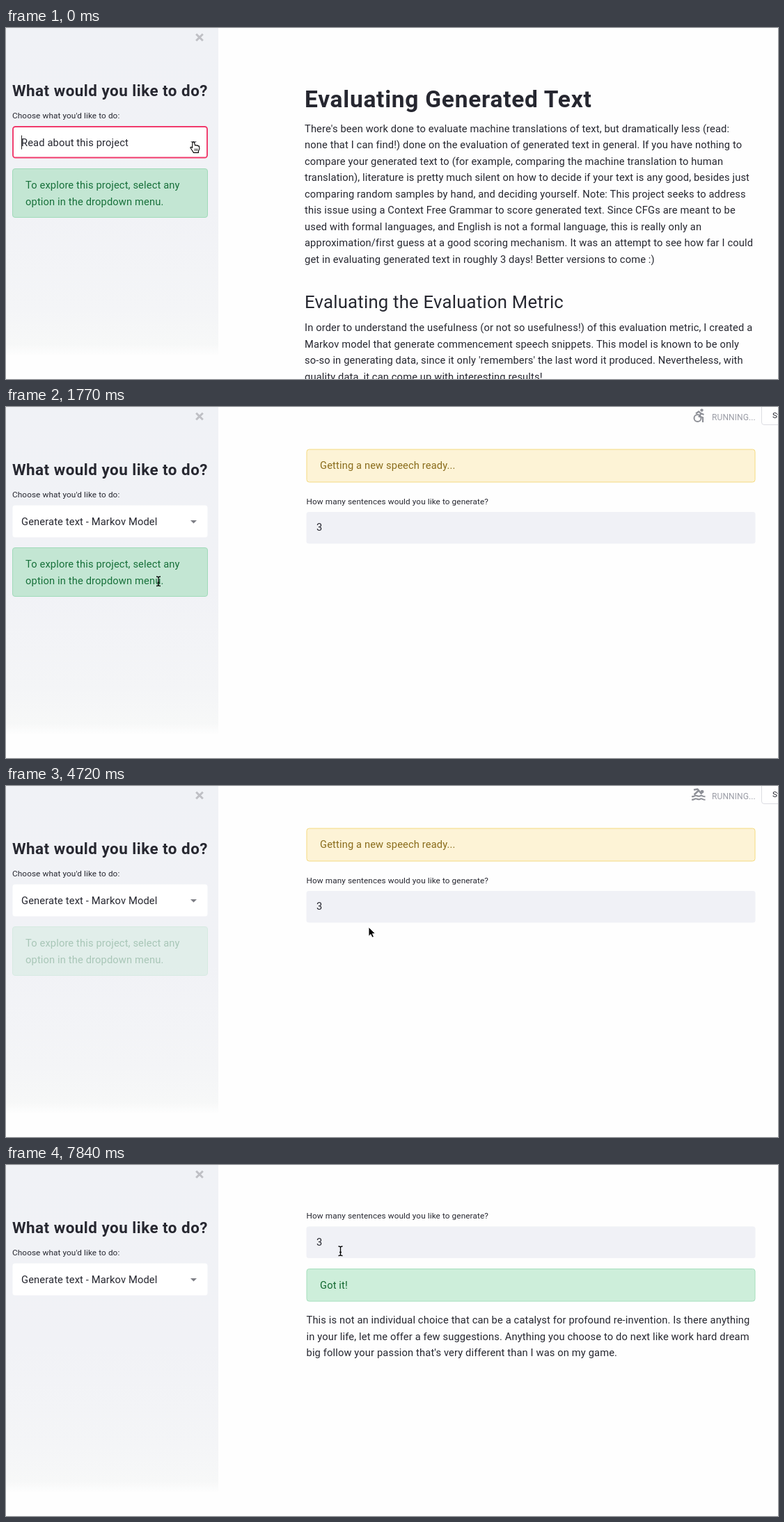
Recreate the animation shown at these times as an HTML page. Size 1109 by 505 pixels, loop 7990 ms.

```html
<!DOCTYPE html>
<html lang="en">
<head>
<meta charset="utf-8">
<title>Evaluating Generated Text</title>
<style>
  html, body { margin: 0; width: 100%; height: 100%; overflow: hidden; background: #fefefe; }
  svg { display: block; width: 1109px; height: 505px; }
  text { font-family: Roboto, "Open Sans", sans-serif; letter-spacing: .009em; white-space: pre; }
  text.bold { font-weight: 700; letter-spacing: .022em; }
</style>
</head>
<body>
<svg id="stage" viewBox="0 0 1109 505" xmlns="http://www.w3.org/2000/svg"></svg>
<script>
const LOOP = 7990, STEP = 148;
const INK = "#262730", GREY = "#808495";
const BODY = 14.7, SMALL = 11.75, LEAD = 23.55, ROW = 38.45;

const text = (x, y, str, size = BODY, fill = INK, cls = "") =>
  `<text x="${x}" y="${y}" font-size="${size}" fill="${fill}" class="${cls}">${str}</text>`;
const lines = (x, y, list, fill = INK) =>
  list.map((s, i) => text(x, y + i * LEAD, s, BODY, fill)).join("");
const rect = (x, y, w, h, fill, stroke = "none", sw = 1) =>
  `<rect x="${x}" y="${y}" width="${w}" height="${h}" rx="3.5" fill="${fill}" stroke="${stroke}" stroke-width="${sw}"/>`;
const group = (id, inner) => `<g id="${id}">${inner}</g>`;
const line = (d, w = 2.2) =>
  `<path d="${d}" fill="none" stroke="#8e9097" stroke-width="${w}" stroke-linejoin="round"/>`;
const dot = (x, y, r = 2.1) => `<circle cx="${x}" cy="${y}" r="${r}" fill="#8e9097"/>`;

const sidebar = `
  <rect width="305" height="472" fill="url(#side)"/>
  <path d="M273.2 8.7l9.6 9.6m0-9.6l-9.6 9.6" stroke="#bfc0c5" stroke-width="3"/>`
  + text(9, 98, "What would you like to do?", 22.4, INK, "bold")
  + text(9, 130, "Choose what you'd like to do:", SMALL);

const article =
  text(429, 113.5, "Evaluating Generated Text", 33.5, INK, "bold")
  + lines(429, 149.5, [
    "There's been work done to evaluate machine translations of text, but dramatically less (read:",
    "none that I can find!) done on the evaluation of generated text in general. If you have nothing to",
    "compare your generated text to (for example, comparing the machine translation to human",
    "translation), literature is pretty much silent on how to decide if your text is any good, besides just",
    "comparing random samples by hand, and deciding yourself. Note: This project seeks to address",
    "this issue using a Context Free Grammar to score generated text. Since CFGs are meant to be",
    "used with formal languages, and English is not a formal language, this is really only an",
    "approximation/first guess at a good scoring mechanism. It was an attempt to see how far I could",
    "get in evaluating generated text in roughly 3 days! Better versions to come :)"])
  + text(429, 402.5, "Evaluating the Evaluation Metric", 25.7)
  + lines(429, 436, [
    "In order to understand the usefulness (or not so usefulness!) of this evaluation metric, I created a",
    "Markov model that generate commencement speech snippets. This model is known to be only",
    "so-so in generating data, since it only 'remembers' the last word it produced. Nevertheless, with",
    "quality data, it can come up with interesting results!"]);

const question =
  text(431.5, 139.5, "How many sentences would you like to generate?", SMALL)
  + rect(431.5, 151, 645, 45.5, "#f0f1f6")
  + text(446, 178.3, "3");

const warning = rect(432, 61, 644, 47, "#fdf3d6", "#f4da80")
  + text(451, 89.3, "Getting a new speech ready...", BODY, "#8a6c1b");

const result = rect(432, 149.5, 644, 46.5, "#cdeeda", "#a6dfbd")
  + text(451, 177.5, "Got it!", BODY, "#12682f")
  + lines(431.5, 228, [
    "This is not an individual choice that can be a catalyst for profound re-invention. Is there anything",
    "in your life, let me offer a few suggestions. Anything you choose to do next like work hard dream",
    "big follow your passion that's very different than I was on my game."]);

const alertBox = rect(9.5, 202.5, 280, 70, "#c3e6d3", "#a0dab9")
  + lines(28, 231, ["To explore this project, select any", "option in the dropdown menu."], "#17703a");

const options = ["Read about this project", "Generate text - Markov Model", "Classify the type of speaker", "Evaluate text"];
const menu = `<rect x="8" y="195" width="281" height="168" rx="3.5" fill="#fff" filter="url(#shade)"/>`
  + options.map((s, i) => text(23, 225.7 + i * ROW, s, BODY, i ? GREY : INK, i ? "option" : "bold")).join("");

const icons = {
  run: `<path transform="translate(983 .8) scale(.93)" fill="#8e9097" d="M13.5 5.5c1.1 0 2-.9 2-2s-.9-2-2-2-2 .9-2 2 .9 2 2 2zm-3.6 13.9l1-4.4 2.1 2v6h2v-7.5l-2.1-2 .6-3c1.3 1.5 3.3 2.5 5.5 2.5v-2c-1.9 0-3.5-1-4.3-2.4l-1-1.6c-.4-.6-1-1-1.7-1-.3 0-.5.1-.8.1l-5.2 2.2v4.7h2v-3.4l1.8-.7-1.6 8.1-4.9-1-.4 2 7 1.4z"/>`,
  swim: dot(1000, 8.2, 2.4) + line("M988 5.5l5.5-1 6 7.2M995 6.5l-6.5 6", 2.4)
    + [15.3, 19.8].map(y => line(`M985 ${y}q2.5 0 4-1t4 0 4 0 3.5 0 4 1`, 2)).join(""),
  wheel: dot(999.5, 4.6, 2.2) + `<circle cx="993.5" cy="16" r="5" fill="none" stroke="#8e9097" stroke-width="2"/>`
    + line("M991 9.5l4.2-3 3.3 3.2-3 4 5.5 1.3v7M998 9l4.5 2"),
  climb: dot(997.5, 4, 2.2) + line("M995 8l-2.5 6.5 6 2.5-.5 6M994.5 8.5l-5 5M996 9l3 3.5 3-.5M992.5 14l-2.5 4.5-3 3.5", 2.4)
};
const cycle = ["swim", "wheel", "climb", "run", "wheel", "swim", "climb", "run"];

const status = Object.entries(icons).map(([id, art]) => group(id, art)).join("")
  + text(1014, 18.8, "RUNNING...", 12, "#9b9da6")
  + rect(1085.5, -8, 60, 33.5, "#fff", "#dcdde2")
  + text(1101, 16.3, "Stop", SMALL);

const pointers = {
  arrow: `<path d="M0 0V13.2L3 10.4 5 15 7.4 14 5.4 9.5H9.5Z" fill="#000" stroke="#fff" stroke-width=".9"/>`,
  beam: `<path d="M-3-6.5q3 0 3 1.5 0-1.5 3-1.5M0-5V5.5M-3 7q3 0 3-1.5 0 1.5 3 1.5M-1.5 2h3" fill="none" stroke="#000" stroke-width="1.3"/>`,
  hand: `<path d="M-2-6.5q1.5-1.4 2.5.2l1 4.3 1.5-.6 1 .8 1.4-.3.8 1 1.2 0 .5 4-1.5 3.5v2H-.5L-3 4.5-5.2 1q.8-1.6 2.7.3z" fill="#fff" stroke="#000" stroke-width="1.1" stroke-linejoin="round"/>
    <path d="M1.3 2.5v3.3M3.2 2.5v3.3M5 2.5v3.3" stroke="#000" stroke-width=".8"/>`
};

const stage = document.getElementById("stage");
stage.innerHTML = `
  <defs>
    <linearGradient id="side" x2="0" y2="1">
      <stop offset="0" stop-color="#f0f2f6"/><stop offset=".55" stop-color="#f1f2f6"/>
      <stop offset=".86" stop-color="#f4f5f7"/><stop offset=".965" stop-color="#f7f8f8"/>
      <stop offset="1" stop-color="#fefefe"/>
    </linearGradient>
    <filter id="shade" x="-10%" y="-10%" width="120%" height="125%">
      <feDropShadow dx="0" dy="3.5" stdDeviation="4.5" flood-color="#000" flood-opacity=".32"/>
    </filter>
  </defs>
  <rect width="1109" height="505" fill="#fefefe"/>`
  + sidebar + group("article", article) + group("question", question)
  + group("warning", warning) + group("result", result) + group("status", status)
  + group("alert", alertBox)
  + rect(9.5, 141.5, 280, 46, "#fff")
  + group("focus", rect(10, 142, 279, 44.5, "#fff", "#f0396b", 1.9)
    + `<path d="M22.5 154.5v20" stroke="#222"/>`)
  + `<text id="choice" x="22" y="170" font-size="${BODY}" fill="${INK}"></text>
    <path d="M265 163h9l-4.5 4.6z" fill="#7d7e85"/>`
  + group("menu", menu)
  + group("cursor", Object.entries(pointers).map(([id, art]) => group(id, art)).join(""));

const el = id => document.getElementById(id);
const show = (id, on) => { el(id).style.display = on ? "" : "none"; };
const clamp = v => Math.max(0, Math.min(1, v));

// Cursor path: step, x, y
const path = [
  [0, 270, 171], [2, 270, 171], [5, 225, 218], [8, 181.8, 260.5], [9, 182, 260.5],
  [12, 219, 250.5], [13, 250, 252], [17, 530.8, 272], [27, 530.8, 272], [30, 529, 259],
  [32, 521, 203], [37, 496, 176], [50, 496, 176], [51, 493, 166], [53, 480.5, 123.5]
];

function cursorAt(n) {
  const k = path.findIndex(p => p[0] >= n);
  if (k < 1) return path[k < 0 ? path.length - 1 : 0].slice(1);
  const [a, x0, y0] = path[k - 1], [b, x1, y1] = path[k];
  const u = (n - a) / (b - a), e = u * u * (3 - 2 * u);
  return [x0 + (x1 - x0) * e, y0 + (y1 - y0) * e];
}

function draw(t) {
  const n = Math.floor((t + 20) / STEP);
  const open = n >= 1 && n < 9, picked = n >= 9, generated = n >= 10, done = n >= 48;

  show("article", !generated);
  show("question", generated);
  el("question").setAttribute("transform", `translate(0 ${done ? -62.5 : 0})`);
  show("warning", generated && !done);
  show("result", done);

  show("status", picked && n < 49);
  for (const id in icons) show(id, id === cycle[n % cycle.length]);

  show("alert", !done);
  el("alert").setAttribute("opacity", 1 - .67 * clamp((n * STEP - 1750) / 1000) ** 1.7);

  show("focus", !picked);
  el("choice").textContent = options[picked ? 1 : 0];

  const [x, y] = cursorAt(n);
  show("menu", open);
  const hover = Math.floor((y - 201) / ROW);
  stage.querySelectorAll(".option").forEach((o, i) => o.setAttribute("fill", hover === i + 1 ? INK : GREY));

  const shape = n <= 2 ? "hand" : (n >= 10 && n <= 13) || n >= 53 ? "beam" : "arrow";
  for (const id in pointers) show(id, id === shape);
  el("cursor").setAttribute("transform", `translate(${x} ${y})`);
}

const start = performance.now();
function tick() {
  draw((performance.now() - start) % LOOP);
  requestAnimationFrame(tick);
}
tick();
</script>
</body>
</html>
```
